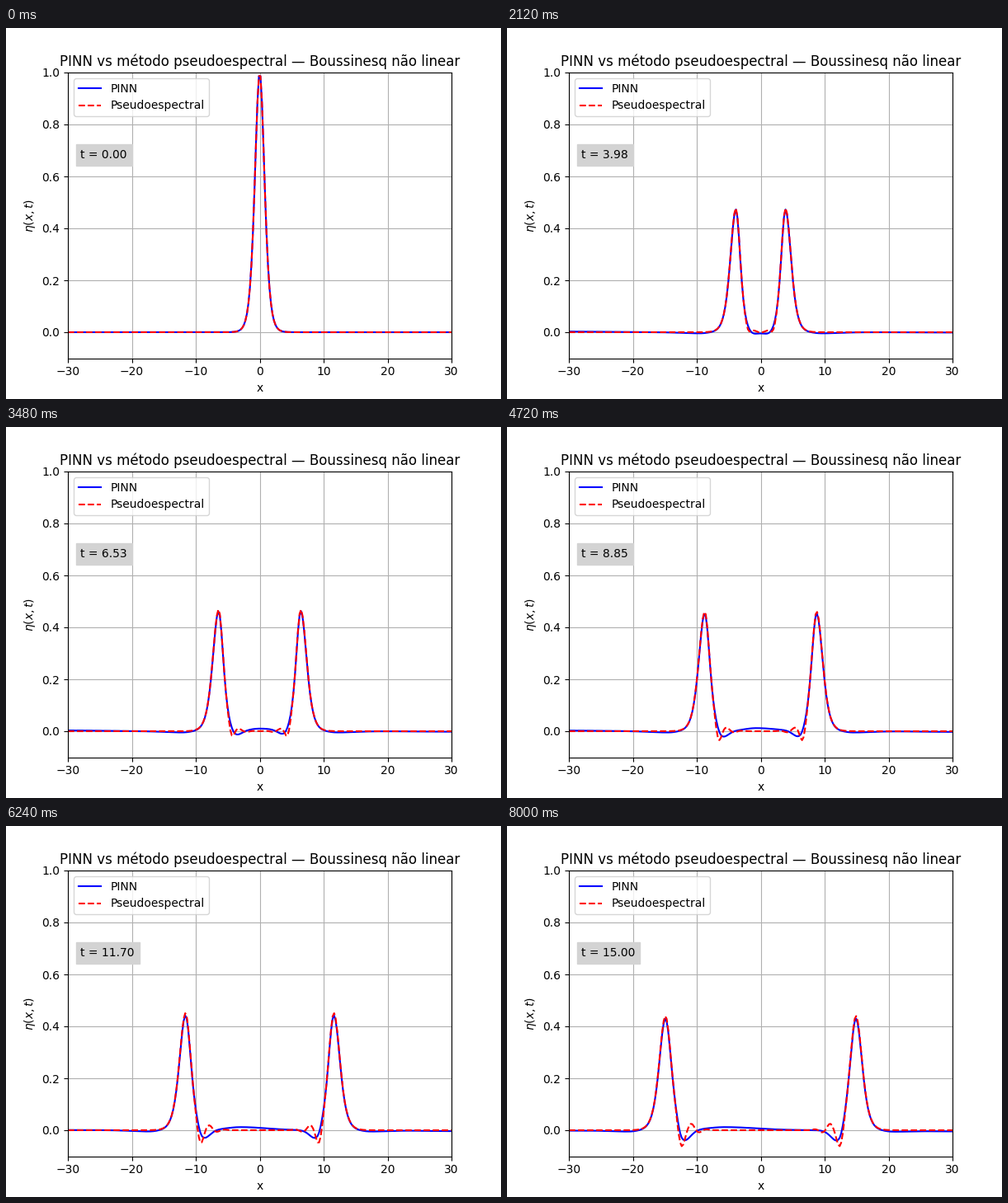
Write a matplotlib script that moves like this. It is 600 by 450 pixels and loops after 8.04 s.

```python
import numpy as np
import matplotlib.pyplot as plt
from matplotlib.animation import FuncAnimation

FRAMES = 201
T_END = 15
x = np.linspace(-30, 30, 256)


def bell(s, front, back=None):
    width = np.where(s < 0, front, front if back is None else back)
    return np.exp(-(s / width) ** 2)


def crest(s, t, loss=0):
    """Skewed sech^2 pulse; s is the distance behind the peak."""
    amp = .491 - .0034 * t + .009 * np.exp(-t) - loss
    front = 1 + .31 * (1 - np.exp(-t / 5))
    back = .8 + .028 * t + .2 * np.exp(-t)
    return amp / np.cosh(s / np.where(s < 0, front, back)) ** 2


def mirrored(half, t):
    """Two equal waves leaving the origin in opposite directions."""
    peak = t - .1 * (1 - np.exp(-t))
    return half(peak - x) + half(peak + x)


def spectral(t):
    age = max(t - 2.3, 0)
    dip = .118 * (1 - np.exp(-age / 9))
    bump = .0019 * age
    bump_at = 2.4 + .11 * t

    def half(s):
        # Each trailing ripple is weaker than the one before
        tail = sum(bump * (-.4) ** k * bell(s - bump_at - 1.15 * k, .65)
                   for k in range(3))
        return (crest(s, t) + tail
                - dip * bell(s - 1.72 - .049 * t, .4 + .0235 * t))

    return mirrored(half, t)


def network(t):
    dip = .0042 * max(t - 1.8, 0)
    ahead = .005 * (1 - np.exp(-t / 2))

    def half(s):
        return (crest(s, t, .01 * np.sqrt(t / T_END))
                - dip * bell(s - 2.6, .85, 1 + .04 * t)
                - ahead * bell(s + 5.6, 4, 1.8))

    hump = .012 * np.clip((t - 4) / 3, 0, 1)
    hump_at = -.8 * max(t - 8, 0)
    drift = (hump * bell(x - hump_at, 1 + .2 * t, 1 + .4 * t)
             + .003 * np.sin(t / 4) * bell(x + 30, 7)
             - .0003 * t * bell(x - 30, 7))
    return mirrored(half, t) + drift


fig, ax = plt.subplots(figsize=(6, 4.5), dpi=100)
net_line, = ax.plot(x, network(0), "b-", label="PINN")
spec_line, = ax.plot(x, spectral(0), "r--", label="Pseudoespectral")
clock = ax.text(-28, .67, "t = 0.00",
                bbox=dict(facecolor="lightgray", edgecolor="lightgray"))
ax.set_xlim(-30, 30)
ax.set_ylim(-.1, 1)
ax.set_xlabel("x")
ax.set_ylabel(r"$\eta(x,t)$")
ax.set_title("PINN vs método pseudoespectral — Boussinesq não linear")
ax.legend(loc="upper left")
ax.grid(True)


def update(i):
    t = T_END * i / (FRAMES - 1)
    net_line.set_ydata(network(t))
    spec_line.set_ydata(spectral(t))
    clock.set_text(f"t = {t:.2f}")
    return net_line, spec_line, clock


anim = FuncAnimation(fig, update, frames=FRAMES, interval=40, repeat=True)
plt.show()
```
